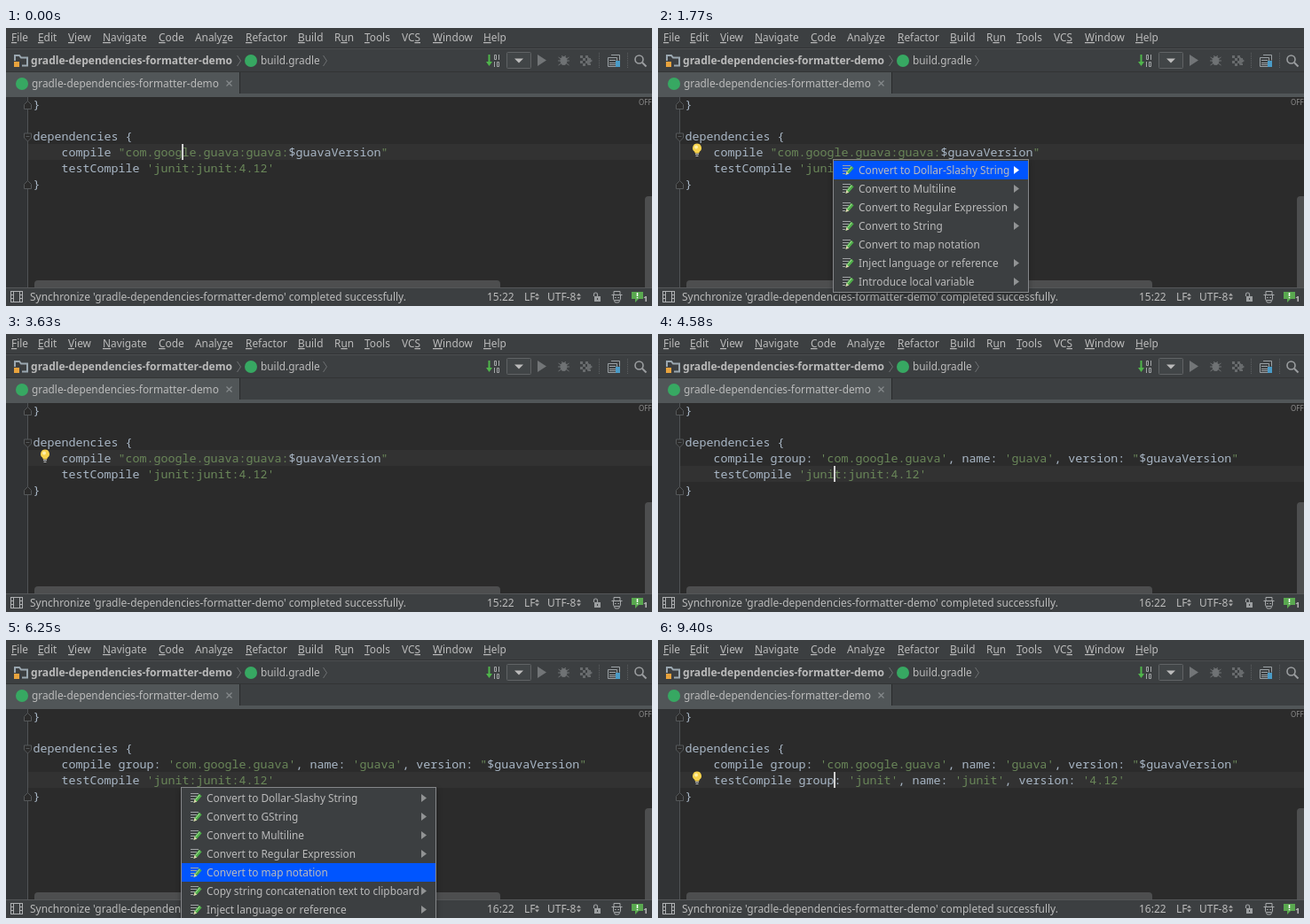
An HTML page for the animation above (9880 ms loop, 728 by 314 pixels).

```html
<!DOCTYPE html>
<html lang="en">
<head>
<meta charset="utf-8">
<title>Dependency notation demo</title>
<style>
  html, body { margin: 0; width: 100%; height: 100%; overflow: hidden; background: #2b2b2b; }
  svg { display: block; width: 728px; height: 314px; }
  text { font: 11.85px "Noto Sans", "Open Sans", sans-serif; fill: #bbb; white-space: pre; }
  .bold { font-size: 12.06px; font-weight: 700; }
  .status { font-size: 11.96px; }
  .code { font: 13.333px "Noto Sans Mono", "DejaVu Sans Mono", monospace; fill: #a9b7c6; }
  .str { fill: #6a8759; }
  .u { text-decoration: underline; }
  .off { font-size: 8px; fill: #8a8a8a; }
  .count { font-size: 9.5px; font-weight: 700; }
  .menu { filter: drop-shadow(0 3px 3px rgba(0, 0, 0, .3)); }
  .arrow { fill: #919394; }
  .on .arrow { fill: #fff; }
</style>
</head>
<body>
<svg viewBox="0 0 728 314">
  <defs>
    <g id="pencil">
      <path d="M0 1.5h9M0 4.5h7M0 7.5h5M0 10.5h3" stroke="#a0a3a5"/>
      <path d="M3.5 12l.8-3.8L9.6 1.8l3 2.4-5.400 6.400z" fill="#4fae4a"/>
      <path d="M5.200 8.700l5.200-6" stroke="#b5e3a0"/>
      <path d="M3.500 12l.8-3.800 2.900 2.400z" fill="#e4d6b4"/>
    </g>
    <path id="foldEnd" d="M-4 4.500v-5L0-4.500 4-.5v5z" fill="#2b2b2b" stroke="#55585a"/>
    <path id="foldStart" d="M-4-4.500v5L0 4.500 4 .5v-5zM-2-1h4" fill="#2b2b2b" stroke="#55585a"/>
    <path id="chevron" d="M0-6l4 6-4 6" fill="none" stroke="#6c6f71"/>
    <path id="updown" d="M0-1l2.500-3L5-1zM0 1l2.500 3L5 1z" fill="#aaa"/>
    <g id="bug" fill="#6f7274" stroke="#6f7274">
      <ellipse rx="3.500" ry="4.500"/>
      <path d="M-6-4l3 2M6-4l-3 2M-6.500 0h13M-6 5l3-2M6 5l-3-2M-2-6l1 2M2-6l-1 2" fill="none"/>
    </g>
  </defs>

  <!-- editor -->
  <rect width="728" height="314" fill="#2b2b2b"/>
  <rect y="78" width="25" height="216" fill="#313335"/>
  <rect id="lineBg" x="25" width="703" height="18" fill="#323232"/>
  <path d="M24.500 78v216" stroke="#505356"/>
  <use href="#foldEnd" x="24.500" y="87"/>
  <use href="#foldStart" x="24.500" y="123.500"/>
  <use href="#foldEnd" x="24.500" y="177"/>
  <text class="off" x="713" y="87">OFF</text>
  <rect x="720" y="190" width="12" height="108" rx="4" fill="#4d4e4f"/>
  <rect x="32" y="285" width="525" height="12" rx="4" fill="#4d4e4f"/>
  <g id="code"></g>
  <g id="bulb">
    <path d="M44 130.500a5 5 0 0 1 3 9l-1 2h-4l-1-2a5 5 0 0 1 3-9z" fill="#f7d24c"/>
    <circle cx="43" cy="134.500" r="2" fill="#fff0a8"/>
    <path d="M42 142.500h4M42.500 144.500h3" stroke="#c3c5c7"/>
  </g>
  <rect id="caret" x="198" width="2" height="18" fill="#d0d0d0"/>

  <!-- menu bar, toolbar, tabs -->
  <rect width="728" height="78" fill="#3c3f41"/>
  <path d="M0 22.500h728M0 49.500h728" stroke="#323435"/>
  <path d="M0 23.500h728" stroke="#4b4e50"/>
  <g id="bar"></g>
  <path d="M10 37v-6h5l2 2.500h7v9h-6" fill="none" stroke="#9aa7b0" stroke-width="2"/>
  <rect x="9" y="38" width="6" height="6" fill="#e8a33d"/>
  <text class="bold" x="28" y="41">gradle-dependencies-formatter-demo</text>
  <use href="#chevron" x="260.500" y="37"/>
  <circle cx="276" cy="37" r="7" fill="#37a862"/>
  <text x="287" y="41">build.gradle</text>
  <use href="#chevron" x="357.500" y="37"/>

  <path d="M544.500 30v9" stroke="#4fb54b" stroke-width="2"/>
  <path d="M541 38h7l-3.500 5z" fill="#4fb54b"/>
  <path d="M550.500 30.500h2v5h-2zM555.500 30v6M550.500 38v6M553.500 38.500h2v5h-2z" fill="none" stroke="#a4a7a9"/>
  <rect x="564.500" y="27.500" width="27" height="18" rx="1" fill="#414547" stroke="#606365"/>
  <path d="M573 34.500h10l-5 5z" fill="#bbb"/>
  <path d="M599 30l10 6.500-10 6.500z" fill="#727577"/>
  <use href="#bug" x="628.500" y="37"/>
  <g fill="#686b6d">
    <path d="M647 31h3v3h-3zM653 31h3v3h-3zM650 34h3v3h-3zM656 34h3v3h-3zM647 37h3v3h-3zM653 37h3v3h-3zM650 40h3v3h-3zM656 40h3v2h-3z"/>
    <path d="M655 32l6 5-6 5z"/>
  </g>
  <path d="M668.500 28v18M700.500 28v18" stroke="#5c5f61" stroke-dasharray="1 1"/>
  <path d="M682 30.500h9.500v6M678.500 33.500h10v10h-10z" fill="none" stroke="#9aa0a4"/>
  <path d="M680 36.500h7M680 39.500h7M680 41.500h7" stroke="#9aa0a4"/>
  <rect x="687" y="37" width="5" height="7" fill="#4a9bc7"/>
  <circle cx="713.500" cy="35.500" r="4.500" fill="none" stroke="#9b9ea0" stroke-width="1.600"/>
  <path d="M717 39l4.500 4.500" stroke="#9b9ea0" stroke-width="2"/>

  <rect y="50" width="263" height="25" fill="#515658"/>
  <rect y="74" width="728" height="4" fill="#515658"/>
  <path d="M263.500 50v24" stroke="#282a2b"/>
  <circle cx="18" cy="63" r="7" fill="#37a862"/>
  <text x="29" y="67">gradle-dependencies-formatter-demo</text>
  <path d="M248.500 59.500l6 6m0-6l-6 6" stroke="#85898b" stroke-width="1.200"/>

  <!-- status bar -->
  <rect y="293" width="728" height="21" fill="#3c3f41"/>
  <path d="M0 293.500h728" stroke="#555759"/>
  <rect x="5.500" y="297.500" width="13" height="12" fill="none" stroke="#afb1b3"/>
  <path d="M8.500 298v12M15.500 298v12M5 301.500h3M5 305.500h3M16 301.500h3M16 305.500h3" stroke="#afb1b3"/>
  <text class="status" x="27" y="308">Synchronize 'gradle-dependencies-formatter-demo' completed successfully.</text>
  <text class="status" id="pos" x="542" y="308"></text>
  <text class="status" x="584" y="308">LF</text>
  <use href="#updown" x="596" y="303.500"/>
  <text class="status" x="610" y="308">UTF-8</text>
  <use href="#updown" x="643" y="303.500"/>
  <rect x="663" y="303" width="7" height="6" fill="#9c9fa1"/>
  <path d="M662.500 303v-2a2 2 0 0 1 4 0v2" fill="none" stroke="#9c9fa1" stroke-width="1.200"/>
  <rect x="666" y="305" width="1" height="2" fill="#3c3f41"/>
  <g fill="none" stroke="#a8abad">
    <path d="M682.500 301.500h12M685 301v-3.500h7v3.500M684.500 302v4l2 4h4l2-4v-4M686 307.500h5"/>
    <path d="M686 304.500h1.500M689.500 304.500h1.500"/>
  </g>
  <path d="M705 298h13v8h-5l-4 4v-4h-4z" fill="#59a84f"/>
  <path d="M711.500 299v4M711.500 304v1.300" stroke="#fff" stroke-width="1.500"/>
  <text class="count" x="718" y="309">1</text>

  <g id="popups"></g>
</svg>
<script>
const LOOP = 9880;
const $ = id => document.getElementById(id);

// Label with "_" before the mnemonic letter, and its x
const bar = [["_File", 6], ["_Edit", 36], ["_View", 70], ["_Navigate", 109], ["_Code", 172],
  ["Analy_ze", 213], ["_Refactor", 270], ["_Build", 329], ["R_un", 370], ["_Tools", 404],
  ["VC_S", 446], ["_Window", 481], ["_Help", 538]];
$("bar").innerHTML = bar.map(([label, x]) =>
  `<text x="${x}" y="15">${label.replace(/_(.)/, '<tspan class="u">$1</tspan>')}</text>`).join("");

const version = `<tspan class="str">"</tspan>$guavaVersion<tspan class="str">"</tspan>`;
const paint = s => s.replace(/'[^']*'/g, '<tspan class="str">$&</tspan>');
const compile = [
  `compile <tspan class="str">"com.google.guava:guava:</tspan>$guavaVersion<tspan class="str">"</tspan>`,
  paint("compile group: 'com.google.guava', name: 'guava', version: ") + version
];
const testCompile = [
  paint("testCompile 'junit:junit:4.12'"),
  paint("testCompile group: 'junit', name: 'junit', version: '4.12'")
];
const codeLine = (x, y, s) => `<text class="code" x="${x}" y="${y}">${s}</text>`;
const drawCode = doc => codeLine(30.5, 91, "}") + codeLine(30.5, 127, "dependencies {") +
  codeLine(62.5, 145, compile[+(doc > 0)]) + codeLine(62.5, 163, testCompile[+(doc > 1)]) +
  codeLine(30.5, 181, "}");

// A trailing ">" marks a submenu
const menus = [
  { y: 148, w: 221, items: ["Convert to Dollar-Slashy String>", "Convert to Multiline>",
    "Convert to Regular Expression>", "Convert to String>", "Convert to map notation",
    "Inject language or reference>", "Introduce local variable>"] },
  { y: 166, w: 288, items: ["Convert to Dollar-Slashy String>", "Convert to GString>",
    "Convert to Multiline>", "Convert to Regular Expression>", "Convert to map notation",
    "Copy string concatenation text to clipboard>", "Inject language or reference>",
    "Introduce local variable>"] }
];
function drawMenu({ y, w, items }, row) {
  const rows = items.map((item, i) => {
    const top = y + 2 + i * 21, on = i === row, ax = 197 + w - 17;
    return `<g class="${on ? "on" : ""}">` +
      (on ? `<rect x="198" y="${top}" width="${w - 2}" height="21" fill="#0055ff"/>` : "") +
      `<use href="#pencil" x="208" y="${top + 4}"/>` +
      `<text x="226" y="${top + 15}">${item.replace(">", "")}</text>` +
      (item.endsWith(">") ? `<path class="arrow" d="M${ax} ${top + 6}l6 4.5-6 4.5z"/>` : "") + "</g>";
  });
  return `<g class="menu"><rect x="197.5" y="${y + .5}" width="${w - 1}" height="${items.length * 21 + 3}"
    fill="#3c3f41" stroke="#85878a"/>${rows.join("")}</g>`;
}

// Each step changes part of the state
const steps = [
  [0, { doc: 0, line: 0, caret: 1, bulb: 0, menu: 0, row: 0 }],
  [400, { caret: 0 }],
  [900, { caret: 1 }],
  [1160, { caret: 0 }],
  [1730, { caret: 1 }],
  [1770, { caret: 0, bulb: 1, menu: 1 }],
  [2050, { row: 1 }],
  [2210, { row: 2 }],
  [2340, { row: 3 }],
  [2470, { row: 4 }],
  [3630, { menu: 0 }],
  [3670, { doc: 1, bulb: 0, caret: 1 }],
  [4580, { line: 1 }],
  [5140, { caret: 0 }],
  [5300, { caret: 1 }],
  [5340, { caret: 0, menu: 2, row: 0 }],
  [5770, { row: 1 }],
  [5930, { row: 2 }],
  [6060, { row: 3 }],
  [6250, { row: 4 }],
  [7300, { menu: 0 }],
  [7360, { doc: 2, caret: 1 }],
  [8410, { bulb: 1 }],
  [8840, { caret: 0 }],
  [9400, { caret: 1 }]
];

function draw(s) {
  const top = 131 + s.line * 18;
  $("lineBg").setAttribute("y", top);
  $("caret").setAttribute("y", top);
  $("caret").style.opacity = s.caret;
  $("bulb").style.opacity = s.bulb;
  $("bulb").setAttribute("transform", `translate(0 ${s.line * 18})`);
  $("pos").textContent = `${15 + s.line}:22`;
  $("code").innerHTML = drawCode(s.doc);
  $("popups").innerHTML = s.menu ? drawMenu(menus[s.menu - 1], s.row) : "";
}

let shown = 0;
const start = performance.now();
function tick(now) {
  const t = Math.max(0, now - start) % LOOP;
  const count = steps.filter(([at]) => at <= t).length;
  if (count !== shown) {
    shown = count;
    draw(Object.assign({}, ...steps.slice(0, count).map(step => step[1])));
  }
  requestAnimationFrame(tick);
}
tick(start);
</script>
</body>
</html>
```
